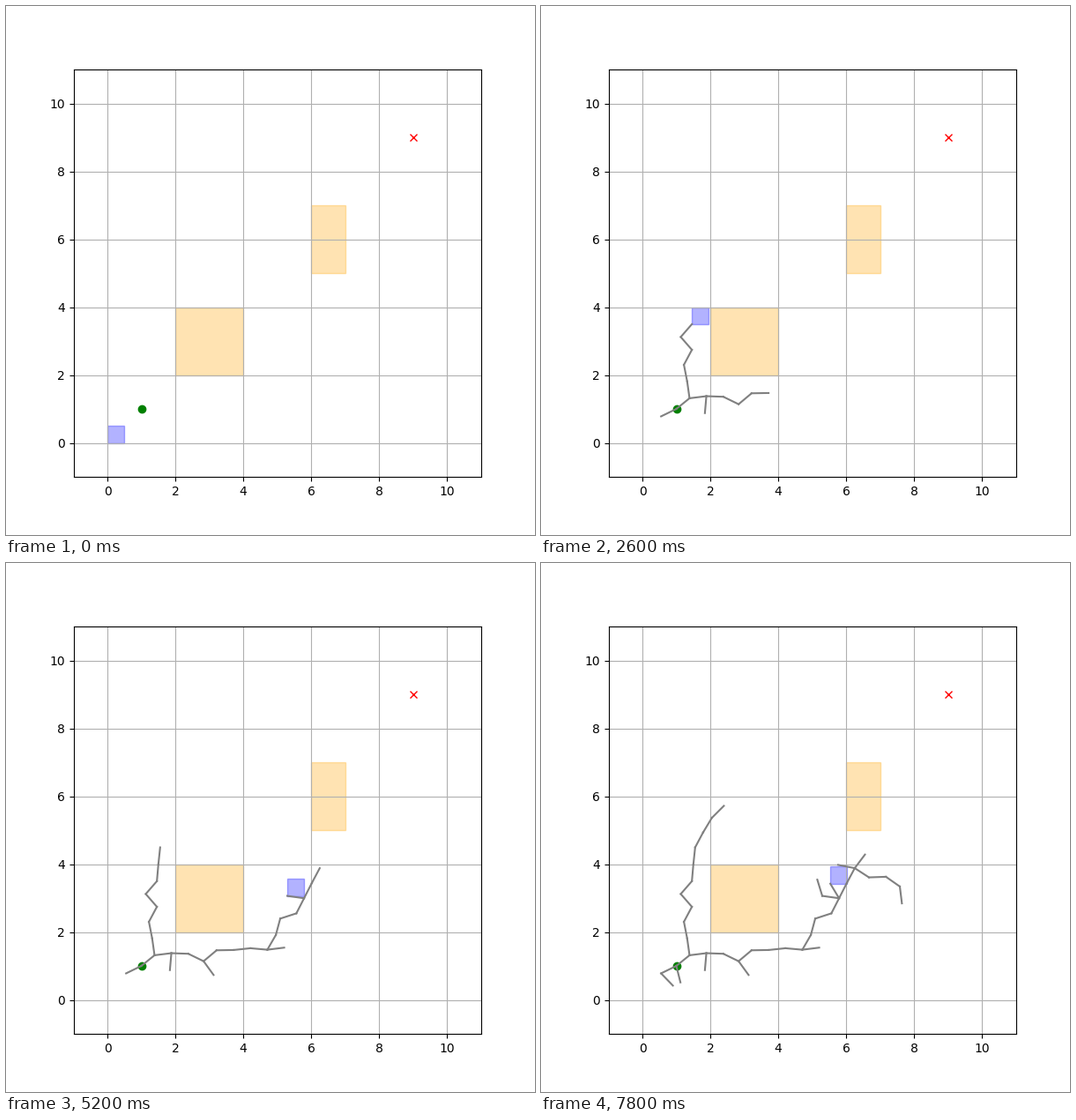
A matplotlib script for the animation above (8 s loop, 600x600 px).

```python
import math

import matplotlib.pyplot as plt
from matplotlib.animation import FuncAnimation
from matplotlib.patches import Rectangle

START, GOAL = (1, 1), (9, 9)
STEP = 0.5  # length of every tree edge and side of the robot

# Runs in order of growth: the node a run sprouts from (0 is the start)
# and the heading in degrees of each edge in it.
RUNS = [
    (0, [206]), (0, [39, 7, -2, -26, 40]), (2, [98]), (6, [1]), (3, [-95]),
    (7, [101, 62, 131, 49]), (8, [6, -5, 60, 75, 18]), (5, [-54]),
    (18, [63]), (13, [85, 84]), (15, [7]), (20, [63, 62]), (20, [172]),
    (1, [-46]), (25, [53]), (25, [-33]), (22, [62, 59]), (29, [2]),
    (26, [107]), (31, [45]), (32, [-35]), (25, [169]), (0, [-76]),
    (35, [-83]), (20, [121]),
]


def grow(runs):
    """Return all nodes and the (parent, child) index pair of each edge."""
    nodes, links = [START], []
    for parent, headings in runs:
        for deg in headings:
            x, y = nodes[parent]
            a = math.radians(deg)
            nodes.append((x + STEP * math.cos(a), y + STEP * math.sin(a)))
            links.append((parent, len(nodes) - 1))
            parent = len(nodes) - 1
    return nodes, links


nodes, links = grow(RUNS)

fig, ax = plt.subplots(figsize=(6, 6), dpi=100)
ax.set_xlim(-1, 11)
ax.set_ylim(-1, 11)
ax.set_aspect("equal")
ax.grid(True)

for corner, w, h in [((2, 2), 2, 2), ((6, 5), 1, 2)]:
    ax.add_patch(Rectangle(corner, w, h, color="orange", alpha=0.3))
robot = ax.add_patch(Rectangle((0, 0), STEP, STEP, color="blue", alpha=0.3))

ax.plot(*START, "go")
ax.plot(*GOAL, "rx")
edges = [ax.plot(*zip(nodes[i], nodes[j]), color="gray")[0] for i, j in links]


def update(step):
    robot.set_xy(nodes[step] if step else (0, 0))
    for i, edge in enumerate(edges):
        edge.set_visible(i < step)
    return [robot, *edges]


anim = FuncAnimation(fig, update, frames=len(nodes), interval=200,
                     repeat=True, repeat_delay=0)
plt.show()
```
